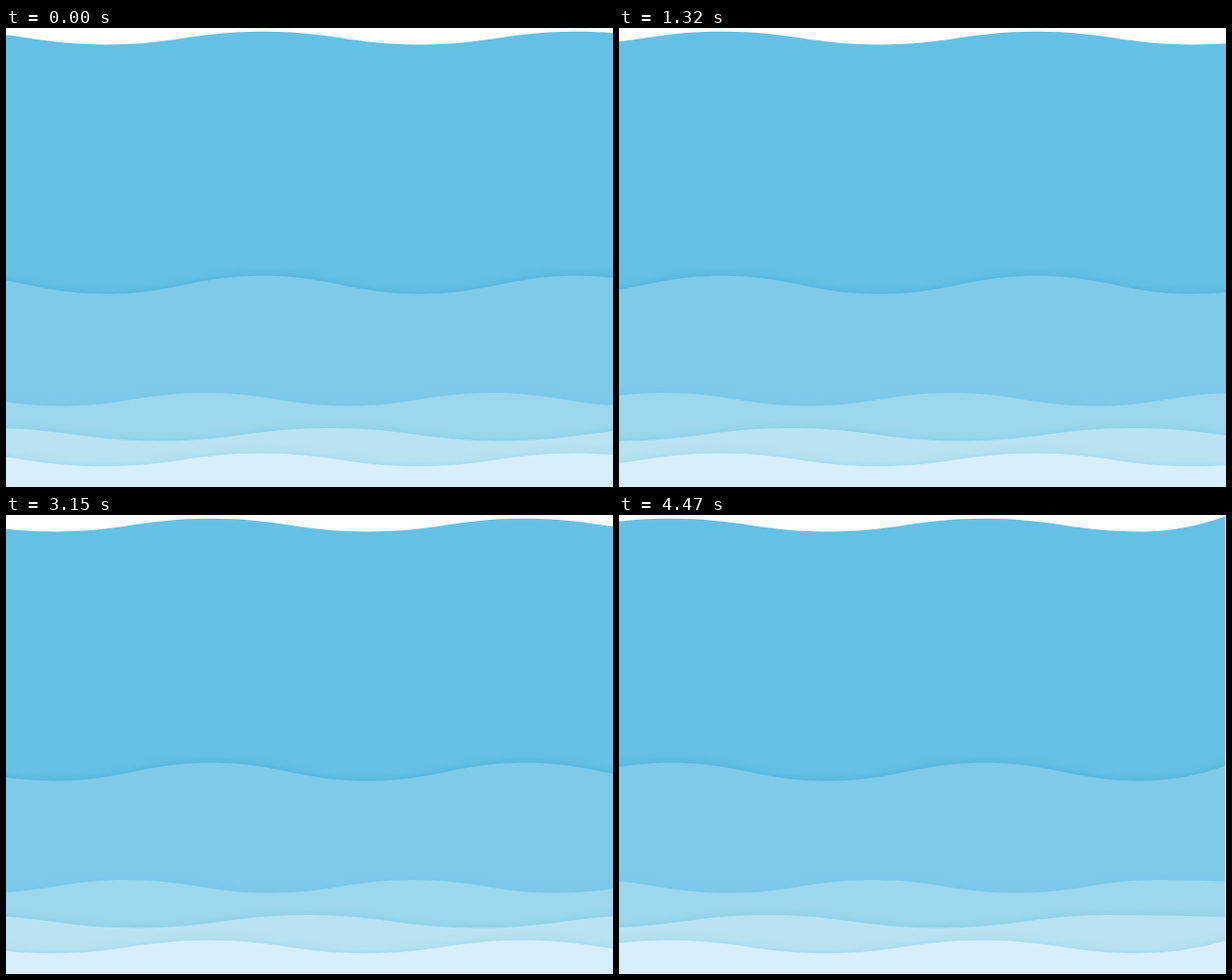
An HTML page with a canvas for the animation above (4500 ms loop, 638 by 483 pixels).

```html
<!DOCTYPE html>
<html>
<head>
<meta charset="utf-8">
<style>
  html, body { margin: 0; width: 100%; height: 100%; overflow: hidden; background: #fff; }
  canvas { display: block; }
</style>
</head>
<body>
<canvas id="stage" width="638" height="483"></canvas>
<script>
const ctx = document.getElementById('stage').getContext('2d');
const W = 638, H = 483;
const LOOP = 4500, STEP = 30, SPEED = 0.122;
const END = 1182.5;   // right end of every wave strip
const EASE = 0.44;    // length of the flat bezier handles

const waves = [
  { color: '#64c1e5', crest: 270, period: 329.7, top: 3.7, bottom: 17.4, endY: 1.5 },
  { color: '#7ecae9', crest: 270, period: 329.7, top: 260.7, bottom: 279.7, endY: 264, shadow: 'rgba(60,160,206,.6)', blur: 9 },
  { color: '#9cd7ed', crest: 209, period: 301.5, top: 384, bottom: 397.7, endY: 385.5, shadow: 'rgba(110,193,228,.35)', blur: 9 },
  { color: '#b9e3f3', crest: 341, period: 360, top: 421, bottom: 434.5, endY: 423, shadow: 'rgba(110,190,225,.45)', blur: 8 },
  { color: '#d7effa', crest: 268, period: 329.7, top: 447.5, bottom: 461.2, endY: 448, shadow: 'rgba(130,200,230,.5)', blur: 8 }
];

function drawWave({ color, crest, period, top, bottom, endY, shadow, blur }) {
  const half = period / 2, handle = half * EASE;
  let x = crest - period, y = top;
  ctx.beginPath();
  ctx.moveTo(x, H + 40);
  ctx.lineTo(x, y);
  while (x + half < END) {
    const nextY = y === top ? bottom : top;
    ctx.bezierCurveTo(x + handle, y, x + half - handle, nextY, x + half, nextY);
    x += half;
    y = nextY;
  }
  ctx.quadraticCurveTo((x + END) / 2, y, END, endY);
  ctx.lineTo(END, H + 40);
  ctx.fillStyle = color;
  ctx.shadowColor = shadow || 'transparent';
  ctx.shadowBlur = blur || 0;
  ctx.fill();
}

function render(now) {
  const time = Math.floor((now % LOOP) / STEP) * STEP;
  ctx.clearRect(0, 0, W, H);
  ctx.save();
  ctx.translate(-time * SPEED, 0);
  ctx.beginPath();
  ctx.rect(0, 0, END, H);
  ctx.clip();
  waves.forEach(drawWave);
  ctx.restore();
}

const start = performance.now();
function tick() {
  render(performance.now() - start);
  requestAnimationFrame(tick);
}
tick();
</script>
</body>
</html>
```
